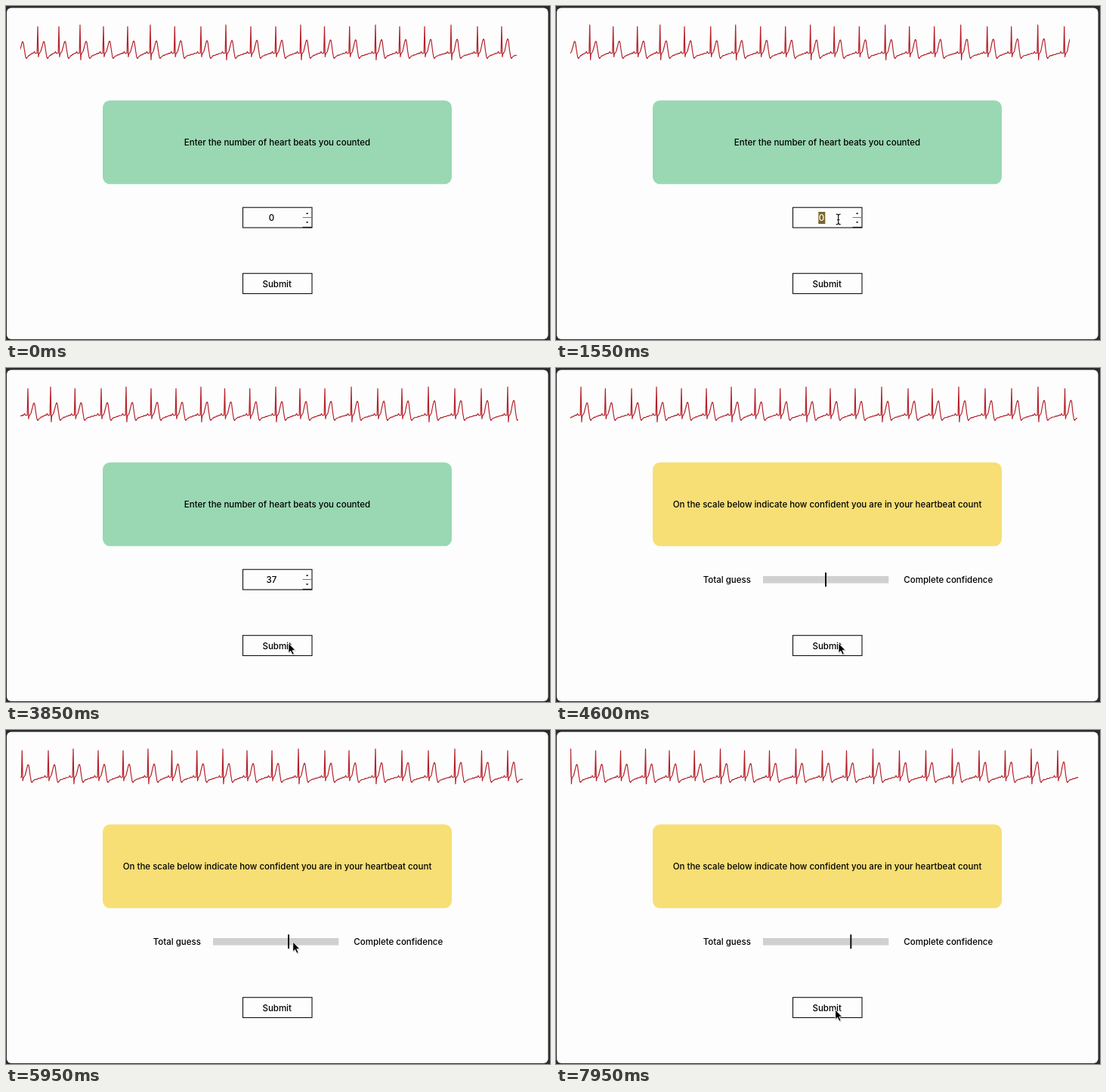
An HTML page for the animation above (8 s loop, 720 by 443 pixels).

```html
<!DOCTYPE html>
<html lang="en">
<head>
<meta charset="utf-8">
<title>Heartbeat counting task</title>
<style>
  html, body { margin: 0; width: 100%; height: 100%; overflow: hidden; background: #2c2b2d; }
  svg { display: block; width: 720px; height: 443px; }
  text { font: 500 11.5px Inter, "Open Sans", sans-serif; text-anchor: middle; }
  .box { fill: #fdfdfd; stroke: #111; stroke-width: 1.1; }
</style>
</head>
<body>
<svg viewBox="0 0 720 443">
  <defs>
    <clipPath id="window"><rect id="reveal" x="19" y="20" width="657" height="60"/></clipPath>
  </defs>
  <rect width="720" height="443" fill="#2c2b2d"/>
  <rect x="1" y="2.5" width="716.5" height="439.5" rx="6" fill="#fdfdfd"/>

  <g clip-path="url(#window)">
    <path id="trace" fill="none" stroke="#b5202a" stroke-width="1.2" stroke-linejoin="round"/>
  </g>

  <rect id="panel" x="128" y="125.3" width="462" height="111" rx="9.5"/>
  <text id="message" x="359" y="185.3"></text>

  <g id="entry">
    <rect class="box" x="313.5" y="267.2" width="91.5" height="26.8"/>
    <path d="M392.5 280.5H405" stroke="#777"/>
    <path d="M392.5 293.5H405" stroke="#111" stroke-width="1.3"/>
    <path d="M397 276l1.6-2.2 1.6 2.2zM397 286l1.6 2.2 1.6-2.2z" fill="#111"/>
    <rect id="selection" x="347.3" y="273" width="9" height="16" fill="#7a682a"/>
    <text id="value" x="351.5" y="285"></text>
  </g>

  <g id="scale">
    <text x="226.3" y="285">Total guess</text>
    <text x="519.3" y="285">Complete confidence</text>
    <rect x="274" y="276" width="166.3" height="9.5" fill="#d0d0d0"/>
    <rect id="marker" x="-1" y="271.3" width="2" height="18.7" fill="#111"/>
  </g>

  <rect class="box" x="313.5" y="354.7" width="91.5" height="26.8"/>
  <text x="358.7" y="373">Submit</text>

  <g id="arrow">
    <path d="M1 1.5V14l2.8-2.6 2.2 5 2.6-1.1-2.2-4.9h4z" fill="#000" opacity=".2"/>
    <path d="M0 0V13l2.9-2.7 2.2 5 2.3-1-2.2-4.9H9.2z" fill="#000" stroke="#fff" stroke-width=".9"/>
  </g>
  <path id="beam" d="M-3-6.5q3 0 3 2.2 0-2.2 3-2.2M0-4.5V5M-3 7.2q3 0 3-2.2 0 2.2 3 2.2M-1.7 1H1.7"
        fill="none" stroke="#111" stroke-width="1.2"/>
</svg>
<script>
  const LOOP = 8000, STEP = 50;
  const $ = id => document.getElementById(id);
  const show = (id, on) => $(id).style.display = on ? '' : 'none';
  const move = (id, x, y) => $(id).setAttribute('transform', `translate(${x} ${y})`);

  // Piecewise linear value from [time, value] keys.
  function track(keys, t) {
    const i = keys.findIndex(k => k[0] > t);
    if (i < 0) return keys[keys.length - 1][1];
    if (i === 0) return keys[0][1];
    const [t0, v0] = keys[i - 1], [t1, v1] = keys[i];
    return v0 + (v1 - v0) * (t - t0) / (t1 - t0);
  }

  const beats = [14, 42, 70, 98, 129, 161, 191, 223.3, 258, 291, 324, 357, 390, 421.5, 454.7, 489,
    521, 554, 589, 624, 656, 691, 726, 761, 796, 831.5, 866, 900.5, 935.5, 970];

  function buildTrace() {
    const points = [];
    for (let i = 0; i < beats.length - 1; i++) {
      const x = beats[i], tall = i % 3 === 0;
      const hump = 47.3 - 0.18 * i;
      const add = (dx, y) => points.push(`${(x + dx).toFixed(1)} ${y.toFixed(1)}`);
      add(-6, 63); add(-4.5, 60.5); add(-3, 63); add(-0.9, 62.5);
      add(0, tall ? 25 : 27.3); add(0.9, tall ? 71.5 : 67.5); add(1.5, 64);
      add(4, 60); add(6, hump + 6); add(7.4, hump + 0.6); add(8.2, hump); add(9, hump + 1.8);
      add(10.5, 59); add(12, 68); add(13, 69.6); add(15, 67);
      const rest = beats[i + 1] - x - 22;
      for (let s = 1; s <= 8; s++) {
        add(15 + rest * s / 8, 66.6 - 4 * s / 8 + 0.45 * Math.sin(s * 2.4 + i));
      }
    }
    $('trace').setAttribute('d', 'M' + points.join('L'));
  }

  const scroll = [[0, 0], [100, 3.4], [300, 3.4], [350, 12], [1550, 53.3], [2500, 87],
    [3850, 132], [4600, 158], [5950, 202], [7950, 271.5], [8000, 273.2]];
  const cursorX = [[50, 366], [350, 368], [900, 373.7], [2650, 373.7], [4750, 374], [5250, 357],
    [5450, 359], [5950, 379.7], [6450, 392], [7200, 392], [7650, 369.7]];
  const cursorY = [[50, 327], [100, 329], [300, 329], [350, 349], [450, 349], [900, 282.5],
    [2650, 282.5], [2850, 356], [3000, 365], [4750, 365], [5250, 281], [7200, 281], [7650, 371]];
  const slider = [[5450, 357], [5950, 374], [6500, 390.3]];

  function render(t) {
    const offset = track(scroll, t);
    // New samples arrive in blocks while the strip scrolls steadily.
    const end = 676 + 19.1 * Math.floor((t + 510) / 560) - offset;
    move('trace', -offset, 0);
    $('reveal').setAttribute('width', end - 19);

    const rating = t >= 4100;
    show('entry', !rating);
    show('scale', rating);
    $('panel').setAttribute('fill', rating ? '#f7df76' : '#99d8b3');
    $('message').textContent = rating
      ? 'On the scale below indicate how confident you are in your heartbeat count'
      : 'Enter the number of heart beats you counted';

    const selected = t >= 1300 && t < 2550;
    show('selection', selected);
    $('value').setAttribute('fill', selected ? '#fff' : '#000');
    $('value').textContent = t < 2550 ? '0' : t < 2700 ? '3' : '37';
    move('marker', track(slider, t), 0);

    const x = track(cursorX, t), y = track(cursorY, t);
    const inField = !rating && y < 294;
    show('arrow', t >= 50 && !inField);
    show('beam', t >= 50 && inField);
    move('arrow', x, y);
    move('beam', x, y);
  }

  buildTrace();
  render(0);
  const start = performance.now();
  function frame() {
    const t = (performance.now() - start) % LOOP;
    render(Math.floor(t / STEP) * STEP);
    requestAnimationFrame(frame);
  }
  requestAnimationFrame(frame);
</script>
</body>
</html>
```
